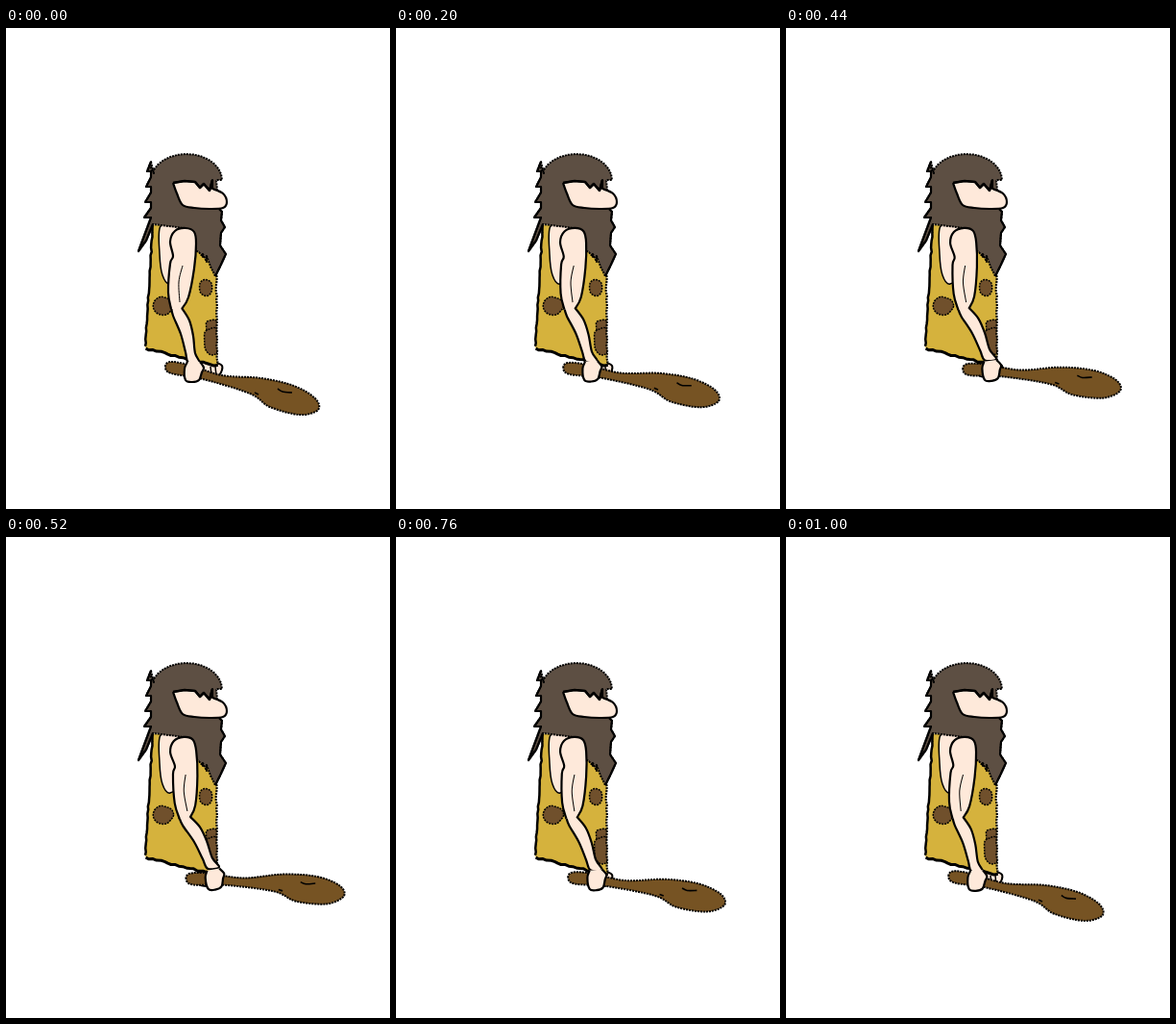
Recreate the animation shown at these times as an HTML page with a canvas. Size 400 by 500 pixels, loop 1040 ms.

```html
<!DOCTYPE html>
<html lang="en">
<head>
<meta charset="utf-8">
<title>Caveman with club</title>
<style>
html, body { margin: 0; width: 100%; height: 100%; overflow: hidden; background: #fff; }
canvas { display: block; }
</style>
</head>
<body>
<canvas id="stage" width="400" height="500"></canvas>
<script>
const ctx = document.getElementById('stage').getContext('2d');
const SKIN = '#fee9da', HAIR = '#5d4f43', HIDE = '#d5b23d', SPOT = '#70502c', WOOD = '#765323';
const STEP = 40, STEPS = 26, PEAK = 13;
const DOTS = [2, 1];

const P = s => s.split(' ').map(p => p.split(',').map(Number));
const jitter = i => { const v = Math.sin(i * 127.1) * 43758.5; return v - Math.floor(v) - 0.5; };

function line(pts) {
  const path = new Path2D();
  pts.forEach(p => path.lineTo(...p));
  return path;
}

// Catmull-Rom curve through key points
function curve(pts, closed) {
  const n = pts.length, path = new Path2D();
  const at = i => closed ? pts[(i + n) % n] : pts[Math.max(0, Math.min(n - 1, i))];
  path.moveTo(...pts[0]);
  for (let i = 0; i < (closed ? n : n - 1); i++) {
    const [a, b, c, d] = [-1, 0, 1, 2].map(o => at(i + o));
    path.bezierCurveTo(b[0] + (c[0] - a[0]) / 6, b[1] + (c[1] - a[1]) / 6,
      c[0] - (d[0] - b[0]) / 6, c[1] - (d[1] - b[1]) / 6, c[0], c[1]);
  }
  return path;
}

// Straight run with a ragged edge
function ragged([x, y], [u, v], amp) {
  const n = Math.round(Math.hypot(u - x, v - y) / 4);
  return Array.from({ length: n + 1 }, (_, i) =>
    [x + (u - x) * i / n + jitter(i + x) * amp, y + (v - y) * i / n + jitter(i + y) * amp]);
}

function blob(x, y, rx, ry) {
  const pts = Array.from({ length: 10 }, (_, i) => {
    const a = i * Math.PI / 5, r = 1 + 0.18 * jitter(i + x);
    return [x + rx * r * Math.cos(a), y + ry * r * Math.sin(a)];
  });
  return curve(pts, true);
}

function ink(path, width = 2.2, dash = []) {
  ctx.lineWidth = width;
  ctx.setLineDash(dash);
  ctx.stroke(path);
}

function shape(path, color, width, dash) {
  ctx.fillStyle = color;
  ctx.fill(path);
  if (width) ink(path, width, dash);
}

const dome = Array.from({ length: 13 }, (_, i) => {
  const a = Math.PI * (1.13 + 0.87 * i / 12);
  return [188 + 37 * Math.cos(a), 158 + 27 * Math.sin(a)];
});
const locks = [0, 1, 2, 3].flatMap(i => [[151, 197 - 16 * i], [147 - (3 - i), 197 - 16 * i], [151, 187 - 16 * i]]);
const beardTips = [0, 1, 2, 3].flatMap(i => [[213 - 4 * i, 248 - 5 * i], [209 - 4 * i, 237 - 2 * i]]);
const beardSide = P('222,188 225,191 224,200 228,207 224,213 223,226 229,235 223,248 218,258');
const neck = P('190,209 178,207 153,204 146,221 138,232');
const hair = line([...dome, ...P('219,158 222,188'), ...beardSide, ...beardTips, ...neck, ...locks, ...P('154,151 149,141')]);

const jaw = curve(P('174,161 178,172 184,184 196,187 212,188 226,187 230,181 226,172 215,167'));
const fringe = P('215,158 212,169 206,162 202,166 197,160 186,159 174,161');
const face = new Path2D(jaw);
fringe.forEach(p => face.lineTo(...p));

const side = ragged([153, 205], [145, 331], 1);
const hem = ragged([145, 333], [220, 351], 2);
const front = ragged([220, 351], [219, 250], 1);
const tunic = line([...side, ...hem, ...front, [185, 207]]);
const armhole = curve(P('161,206 160,235 163,257 171,266 186,250 180,207'), true);
const spots = [[208, 270, 6.5, 8.5], [164, 289, 10, 9.5], [215, 310, 7, 7], [215, 325, 9, 14]].map(s => blob(...s));

const farHand = curve(P('202,348 224,350 222,361 212,363 201,361'), true);
const club = curve(P('166,352 171,347 190,350 225,361 266,364 300,372 322,385 325,397 306,402 275,394 254,380 205,365 172,359'), true);
const upperArm = curve(P('172,292 169,275 171,245 174,237 171,222 176,211 187,208 196,212 198,224 196,250 190,280 183,292'));
const foreArm = curve(P('172,290 174,299 182,318 187,337 190,348 202,349 197,338 195,320 191,304 183,291'));
const hand = curve(P('189,347 186,354 187,366 194,368 201,366 204,358 206,353 202,347'));
const muscle = curve(P('184,247 180,264 181,285'));

function drawBody() {
  shape(farHand, SKIN, 2);
  [213, 218].forEach(x => ink(line([[x, 352], [x + 1, 361]]), 1.5));

  shape(tunic, HIDE);
  ctx.save();
  ctx.clip(tunic);
  spots.forEach(s => shape(s, SPOT, 1.5, DOTS));
  ctx.restore();
  ink(line(side), 2.5);
  ink(line(hem), 3);
  ink(line(front), 2.2, DOTS);
  shape(armhole, SKIN, 1.5);

  shape(hair, HAIR, 2, DOTS);
  ink(line([...neck.slice(2), ...locks]), 2.2);
  ink(line(beardSide), 2.2);
  shape(face, SKIN, 2.2);
  ink(line(fringe), 2.5);
}

// Draws turned by deg about a pivot that has moved by dx, dy
function posed(x, y, deg, dx, dy, paint) {
  ctx.save();
  ctx.translate(x + dx, y + dy);
  ctx.rotate(deg * Math.PI / 180);
  ctx.translate(-x, -y);
  paint();
  ctx.restore();
}

function drawArm(k) {
  const grip = paint => posed(166, 351, -0.74 * k, 1.65 * k, 0.27 * k, paint);
  grip(() => {
    shape(club, WOOD, 2, DOTS);
    ink(curve(P('283,375 288,378 298,379')), 1.6);
    ink(line(P('259,379 263,381')), 1.6);
  });
  posed(178, 292, -0.92 * k, 0.67 * k, 0.03 * k, () => shape(foreArm, SKIN, 2.2));
  grip(() => shape(hand, SKIN, 2.2));
  posed(185, 222, -0.55 * k, 0, 0, () => {
    shape(upperArm, SKIN, 2.2);
    ink(muscle, 1);
  });
}

function draw(now) {
  const n = Math.floor(now / STEP) % STEPS;
  const k = n <= PEAK ? n : 2 * PEAK + 1 - n;
  ctx.fillStyle = '#fff';
  ctx.fillRect(0, 0, 400, 500);
  ctx.strokeStyle = '#000';
  ctx.lineJoin = 'round';
  drawBody();
  drawArm(k);
}

let start;
function tick(now) {
  start ??= now;
  draw(now - start);
  requestAnimationFrame(tick);
}
draw(0);
requestAnimationFrame(tick);
</script>
</body>
</html>
```
